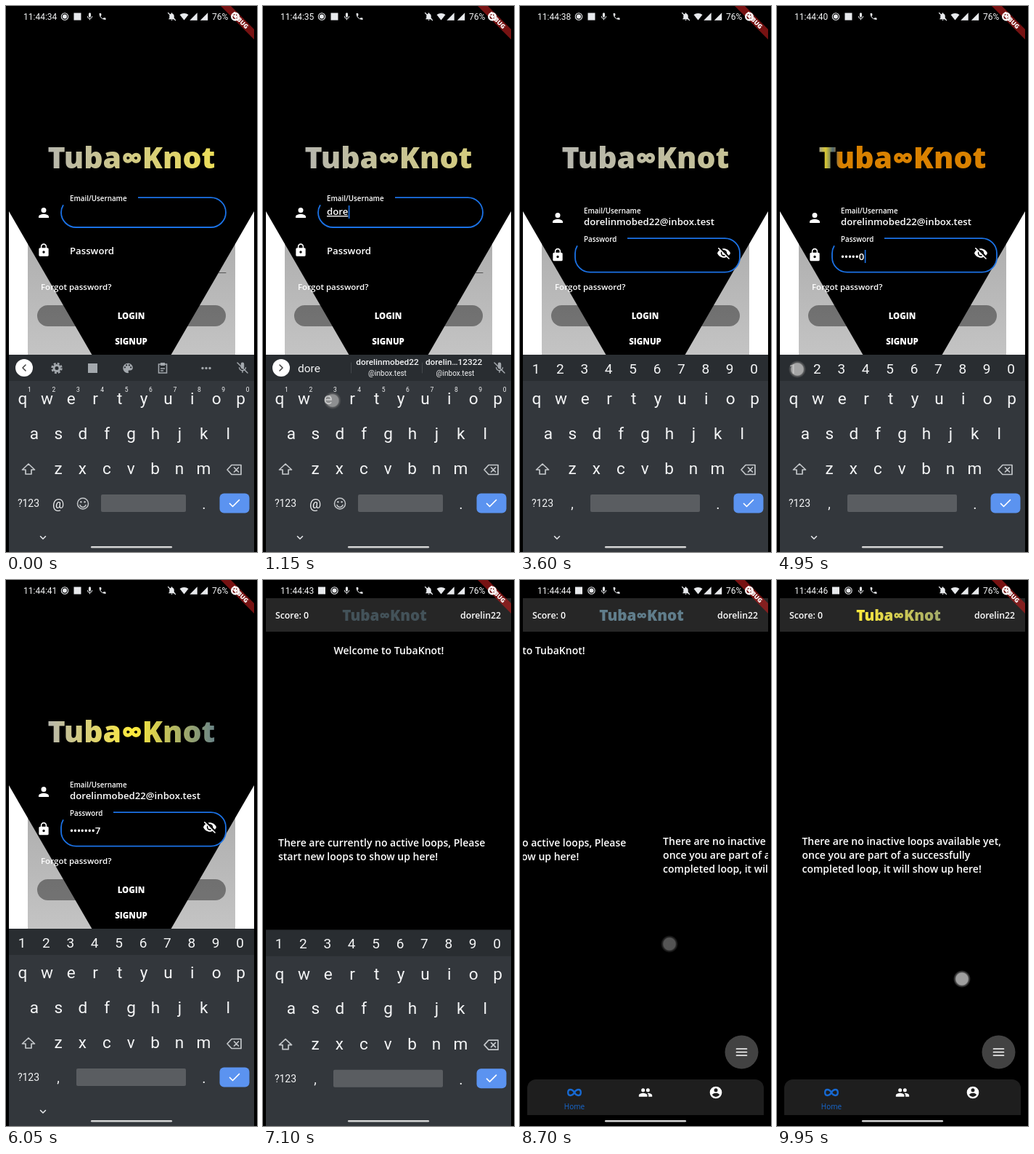
These frames come from a looping animation (346 px wide and 750 px high, 10000 ms). An HTML page:

```html
<!DOCTYPE html>
<html lang="en">
<head>
<meta charset="utf-8">
<title>Login demo</title>
<style>
  html, body { margin: 0; width: 100%; height: 100%; overflow: hidden; background: #000; }
  svg { display: block; width: 346px; height: 750px; }
  text { font-family: "Open Sans", sans-serif; font-weight: 600; fill: #fff; white-space: pre; }
  .r { font-family: Roboto, sans-serif; font-weight: 400; fill: #f4f5f6; }
  .b { font-weight: 800; }
  .m { text-anchor: middle; }
  .e { text-anchor: end; }
  .line { fill: none; stroke: #1b72e6; stroke-width: 1.8; }
  .tool { fill: none; stroke: #a3a8ad; stroke-width: 1.6; }
</style>
</head>
<body>
<svg viewBox="0 0 346 750">
  <defs>
    <clipPath id="screen"><rect x="4" y="0" width="338" height="750"/></clipPath>
    <linearGradient id="card" x1="0" y1="0" x2="0" y2="1">
      <stop offset="0" stop-color="#a9a9a9"/><stop offset="1" stop-color="#c4c4c4"/>
    </linearGradient>
    <linearGradient id="big" gradientUnits="userSpaceOnUse" x1="57" y1="0" y2="0">
      <stop offset="0" stop-color="#b6b6ae"/><stop offset=".333" stop-color="#ffeb3b"/>
      <stop offset=".667" stop-color="#607d8b"/><stop offset="1" stop-color="#ff9800"/>
    </linearGradient>
    <linearGradient id="small" gradientUnits="userSpaceOnUse" x1="109" y1="0" y2="0">
      <stop offset="0" stop-color="#ffeb3b"/><stop offset="1" stop-color="#607d8b"/>
    </linearGradient>
    <radialGradient id="dot">
      <stop offset=".68" stop-color="#bbb"/><stop offset=".8" stop-color="#777" stop-opacity=".7"/>
      <stop offset="1" stop-color="#888" stop-opacity="0"/>
    </radialGradient>
  </defs>
  <rect width="346" height="750"/>
  <g id="stage" clip-path="url(#screen)"></g>
</svg>
<script>
const LOOP = 10000, PITCH = 33.4;
const NAME = 'dorelinm', USER = 'dorelinmobed22', HOST = '@inbox.test', PASS = 'mint2017';
const ROWS = [['1234567890', 22, 498], ['qwertyuiop', 23, 541], ['asdfghjkl', 39, 588], ['zxcvbnm', 72, 636]];
const CLOCK = [0, 600, 1400, 2150, 3050, 4000, 4850, 5650, 6350, 7050, 7950, 8850, 9700];
const typeAt = i => 350 + i * 255;
const passAt = i => 3750 + i * 220;
const FILL = 2690, FOCUS = 3050, HOME = 6750, HIDE = 7080;

const ICONS = {
  person: 'M12 12a4 4 0 1 0 0-8 4 4 0 0 0 0 8zm0 2c-2.67 0-8 1.34-8 4v2h16v-2c0-2.66-5.33-4-8-4z',
  lock: 'M18 8h-1V6A5 5 0 0 0 7 6v2H6a2 2 0 0 0-2 2v10a2 2 0 0 0 2 2h12a2 2 0 0 0 2-2V10a2 2 0 0 0-2-2zm-6 9a2 2 0 1 1 0-4 2 2 0 0 1 0 4zm3.1-9H8.9V6a3.1 3.1 0 0 1 6.2 0z',
  mic: 'M12 14a3 3 0 0 0 3-3V5a3 3 0 0 0-6 0v6a3 3 0 0 0 3 3zm5-3a5 5 0 0 1-10 0H5c0 3.53 2.61 6.43 6 6.92V21h2v-3.08c3.39-.49 6-3.39 6-6.92z',
  call: 'M6.6 10.8a15 15 0 0 0 6.6 6.6l2.2-2.2a1 1 0 0 1 1-.25 11 11 0 0 0 3.6.55 1 1 0 0 1 1 1V20a1 1 0 0 1-1 1A17 17 0 0 1 3 4a1 1 0 0 1 1-1h3.5a1 1 0 0 1 1 1c0 1.25.2 2.45.57 3.57a1 1 0 0 1-.25 1z',
  bell: 'M12 22a2 2 0 0 0 2-2h-4a2 2 0 0 0 2 2zm6-6v-5c0-3.07-1.64-5.64-4.5-6.32V4a1.5 1.5 0 0 0-3 0v.68C7.63 5.36 6 7.92 6 11v5l-2 2v1h16v-1z',
  wifi: 'M12 21.5L.5 7a19 19 0 0 1 23 0z',
  signal: 'M2 22h20V2z',
  people: 'M16 11a3 3 0 1 0 0-6 3 3 0 0 0 0 6zm-8 0a3 3 0 1 0 0-6 3 3 0 0 0 0 6zm0 2c-2.33 0-7 1.17-7 3.5V19h14v-2.5c0-2.33-4.67-3.5-7-3.5zm8 0l-.97.05c1.16.84 1.97 1.97 1.97 3.45V19h6v-2.5c0-2.33-4.67-3.5-7-3.5z',
  account: 'M12 2a10 10 0 1 0 0 20 10 10 0 0 0 0-20zm0 3a3 3 0 1 1 0 6 3 3 0 0 1 0-6zm0 14.2a7.2 7.2 0 0 1-6-3.22c.03-1.99 4-3.08 6-3.08s5.97 1.09 6 3.08a7.2 7.2 0 0 1-6 3.22z',
  palette: 'M12 3a9 9 0 0 0 0 18 1.5 1.5 0 0 0 1.1-2.5 1.5 1.5 0 0 1 1.1-2.5H16a5 5 0 0 0 5-5c0-4.42-4.03-8-9-8zm-5.5 9a1.5 1.5 0 1 1 0-3 1.5 1.5 0 0 1 0 3zm3-4a1.5 1.5 0 1 1 0-3 1.5 1.5 0 0 1 0 3zm5 0a1.5 1.5 0 1 1 0-3 1.5 1.5 0 0 1 0 3zm3 4a1.5 1.5 0 1 1 0-3 1.5 1.5 0 0 1 0 3z'
};
const icon = (name, x, y, s, fill = '#fff') =>
  `<path fill="${fill}" fill-rule="evenodd" transform="translate(${x - s / 2} ${y - s / 2}) scale(${s / 24})" d="${ICONS[name]}"/>`;
const text = (x, y, size, str, cls = '', more = '') =>
  `<text x="${x}" y="${y}" font-size="${size}" class="${cls}" ${more}>${str}</text>`;
const rect = (x, y, w, h, fill, rx = 0) =>
  `<rect x="${x}" y="${y}" width="${w}" height="${h}" rx="${rx}" fill="${fill}"/>`;
const disc = (x, y, r, fill) => `<circle cx="${x}" cy="${y}" r="${r}" fill="${fill}"/>`;
const stroke = (d, color, w) =>
  `<path d="${d}" fill="none" stroke="${color}" stroke-width="${w}" stroke-linecap="round" stroke-linejoin="round"/>`;
const group = (id, ...parts) => `<g id="${id}">${parts.join('')}</g>`;
const keys = ([chars, x, y], size, dy) =>
  [...chars].map((c, i) => text(x + i * PITCH, y + dy, size, c, 'r m')).join('');
// Pill outline with a gap in its top edge for the label
const outline = (top, h, gap) =>
  `<path class="line" d="M${gap} ${top}H282.5a20.5 20.5 0 0 1 20.5 20.5V${top + h - 20.5}a20.5 20.5 0 0 1-20.5 20.5H96.5A20.5 20.5 0 0 1 76 ${top + h - 20.5}V${top + 20.5}A20.5 20.5 0 0 1 79 ${top + 10}"/>`;

const login = group('login',
  rect(4, 281, 338, 200, '#fff'), rect(30, 281, 286, 200, 'url(#card)'),
  rect(43, 411, 260, 29, 'rgba(0,0,0,.4)', 14.5),
  '<path d="M4 282L119 480H227L342 282V0H4z"/>',
  text(173, 223, 41, 'Tuba∞Knot', 'b m', 'id="logo" style="fill:url(#big)"'),
  group('mailOn', text(88, 268, 9.8, 'Email/Username'), outline(263.2, 40.8, 182),
    icon('person', 52, 284, 21), icon('lock', 52, 335.5, 20),
    text(88, 341, 13.2, 'Password'), stroke('M293 366.5H303', '#555', 1)),
  group('passOn', text(88, 284.5, 9.8, 'Email/Username'), icon('person', 52, 291, 21),
    icon('lock', 52, 342, 20), text(88, 324, 9.8, 'Password'), outline(319.2, 46.5, 148),
    '<path fill="#fff" d="M272 339.5c3.4-8.3 14.6-8.3 18 0c-3.4 8.3-14.6 8.3-18 0z"/>',
    disc(281, 339.5, 4.2, '#000'), disc(281, 339.5, 2.6, '#fff'),
    stroke('M275 332L289.5 346.5', '#000', 3), stroke('M273.8 332.8L288 347', '#fff', 1.6)),
  text(88, 287, 13.2, '', '', 'id="mail"'),
  text(88, 349, 13.2, '', '', 'id="pass"'),
  '<rect id="caret" width="1.6" height="18" fill="#1b72e6"/>',
  text(48, 390, 11.5, 'Forgot password?'),
  text(172.5, 429.5, 11.5, 'LOGIN', 'b m'), text(172.5, 464.5, 11.5, 'SIGNUP', 'b m'));

const home = group('home', rect(4, 0, 338, 750, '#000'),
  group('pages', text(173.5, 102, 14, 'Welcome to TubaKnot!', 'm'),
    text(21, 366, 14, 'There are currently no active loops, Please'),
    text(21, 385, 14, 'start new loops to show up here!'),
    ['There are no inactive loops available yet,', 'once you are part of a successfully',
      'completed loop, it will show up here!'].map((s, i) => text(357, 364 + 19 * i, 14, s)).join('')),
  rect(4, 25, 338, 46, '#262626'), text(17, 52.5, 12.3, 'Score: 0'),
  text(328, 52.5, 12.3, 'dorelin22', 'e'),
  text(167.5, 56, 20.7, 'Tuba∞Knot', 'b m', 'id="title" style="fill:url(#small)"'),
  disc(305.5, 648.5, 23, '#424242'),
  stroke('M298.5 644H312.5M298.5 648.5H312.5M298.5 653H312.5', '#fff', 1.7),
  '<path fill="#1e1e1e" d="M10 735V698a12 12 0 0 1 12-12H324a12 12 0 0 1 12 12V735z"/>',
  stroke('M75 704c-3-5.3-8.8-5.3-8.8 0s5.8 5.3 8.8 0s8.8-5.3 8.8 0s-5.8 5.3-8.8 0', '#1769d2', 2.4),
  text(75, 727, 10, 'Home', 'm', 'style="fill:#1769d2;font-weight:400"'),
  icon('people', 173, 704, 20), icon('account', 270, 704, 20));

const chevron = dir => disc(25, 497, 12, '#fff') + stroke(`M${25 - 2 * dir} 493l${4 * dir} 4l${-4 * dir} 4`, '#444', 1.6);
const keyboard = group('board',
  rect(4, 479, 338, 290, '#33373c'), rect(4, 479, 338, 36, '#292d31'),
  keys(ROWS[1], 22.6, 6), keys(ROWS[2], 22.6, 6.5), keys(ROWS[3], 22.6, 7),
  stroke('M31 629l8.5 8h-4.5v6h-8v-6h-4.5z', '#c4c7ca', 1.7),
  stroke('M311 630.5h13v13h-13l-6-6.5zM314.5 634l6 6m0-6l-6 6', '#c4c7ca', 1.7),
  text(31, 688, 14, '?123', 'r m'), text(273, 691, 20, '.', 'r m'),
  rect(294.5, 669.5, 41, 27, '#5b93f0', 6), stroke('M308.5 683.5l4 4l9-9', '#fff', 1.7),
  group('mailKeys', [...'1234567890'].map((c, i) => text(32.5 + i * PITCH, 530, 8.5, c, 'r m')).join(''),
    text(72, 690, 18, '@', 'r m'), rect(131, 671, 117, 24, '#5a5d61', 2),
    stroke('M98.5 683.5a7.5 7.5 0 1 0 15 0a7.5 7.5 0 1 0-15 0M102 685.5a4.2 4.2 0 0 0 8 0', '#c4c7ca', 1.5),
    disc(103.4, 681.3, 1.2, '#c4c7ca'), disc(108.6, 681.3, 1.2, '#c4c7ca'),
    icon('mic', 326, 497, 18, '#a3a8ad'), stroke('M319 490L333 504', '#a3a8ad', 1.5)),
  group('tools', chevron(-1),
    '<circle class="tool" cx="70" cy="497.5" r="4" style="stroke-width:3"/>',
    '<circle class="tool" cx="70" cy="497.5" r="6.5" style="stroke-width:2.4;stroke-dasharray:2.9 2.205"/>',
    rect(113, 491, 13, 13, '#a3a8ad'), icon('palette', 168, 497.5, 18, '#a3a8ad'),
    '<path class="tool" d="M210.5 492h11v12h-11zM213 498h6m-6 3h4"/>', rect(213, 490, 6, 4, '#a3a8ad'),
    [271, 276, 281].map(x => disc(x, 497.5, 1.7, '#a3a8ad')).join('')),
  group('hints', chevron(1), text(48, 503, 15.5, '', 'r', 'id="word"'),
    stroke('M121.5 490v14M219.5 490v14', '#44484c', 1),
    text(171.5, 493, 11.8, USER, 'r m', 'style="font-weight:500"'), text(171.5, 507.5, 10, HOST, 'r m'),
    text(263, 493, 11.8, 'dorelin…12322', 'r m', 'style="font-weight:500"'), text(265, 507.5, 10, HOST, 'r m')),
  group('passKeys', keys(ROWS[0], 19, 6.7), text(72, 690, 18, ',', 'r m'), rect(97, 671, 151, 24, '#5a5d61', 2)),
  group('down', stroke('M47.5 728.5l3.5 3.5l3.5-3.5', '#e8eaed', 1.5)));

const status = group('status', text(24, 18.5, 12, '', 'r', 'id="clock"'),
  group('rec', '<circle r="4.7" fill="none" stroke="#e8eaed" stroke-width="1.1"/>', disc(0, 0, 3, '#e8eaed')),
  group('app', rect(-5, -5, 10, 10, '#e8eaed')),
  icon('mic', 115.5, 14.5, 12.5, '#e8eaed'), icon('call', 133, 14.5, 12, '#e8eaed'),
  icon('bell', 228.5, 14.5, 13, '#e8eaed'), stroke('M223.5 9.5l10 10', '#e8eaed', 1.2),
  icon('wifi', 245.5, 14.5, 12.5, '#e8eaed'), icon('signal', 258.5, 14.5, 12.5, '#e8eaed'),
  icon('signal', 273, 14.5, 12.5, '#e8eaed'), text(284, 18.5, 12, '76%', 'r'),
  '<path d="M296 0H310L342 32V46z" fill="#b71c1c" fill-opacity=".65"/>',
  text(322.5, 22.5, 8.4, 'DEBUG', 'b m', 'transform="rotate(45 322.5 19.5)"'),
  '<circle cx="316" cy="14.5" r="4.8" fill="none" stroke="#fff" stroke-width="2.4"/>', disc(316, 14.5, 1.8, '#fff'));

document.getElementById('stage').innerHTML = login + home + keyboard + status +
  rect(117, 742, 112, 2.6, '#d4d4d4', 1.3) + '<circle id="touch" r="12" fill="url(#dot)"/>';
const el = {};
document.querySelectorAll('[id]').forEach(n => el[n.id] = n);

const clamp = v => Math.max(0, Math.min(1, v));
const ramp = (t, a, b) => clamp((t - a) / (b - a));
const show = (id, on) => el[id].style.display = on ? '' : 'none';
const move = (id, x, y) => el[id].setAttribute('transform', `translate(${x} ${y})`);
const count = (t, at, n) => { let i = 0; while (i < n && t >= at(i)) i++; return i; };
const keyPos = c => {
  const [chars, x, y] = ROWS.find(r => r[0].includes(c));
  return [x + chars.indexOf(c) * PITCH + 6, y + 1];
};

// Taps as [time, x, y]
const TAPS = [
  ...[...NAME].map((c, i) => [typeAt(i) - 90, ...keyPos(c)]),
  [2590, 171, 497], [2980, 172, 336],
  ...[...PASS].map((c, i) => [passAt(i) - 140, ...keyPos(c)]),
  [5700, 172, 425], [9860, 255, 548]
];
const SWIPE = 8450, RELEASE = 8630;

function drawTouch(t) {
  let x, y, a = 0;
  const tap = TAPS.findLast(p => p[0] <= t);
  if (t >= SWIPE && t < 9000) {
    x = 301 - 95 * ramp(t, SWIPE, RELEASE);
    y = 500;
    a = 1 - ramp(t, RELEASE, RELEASE + 150);
  } else if (tap) {
    [, x, y] = tap;
    a = 1 - ramp(t, tap[0] + 100, tap[0] + 220);
  }
  el.touch.style.opacity = a * .85;
  if (a) move('touch', x, y);
}

function drawForm(t) {
  const typed = count(t, typeAt, NAME.length), filled = t >= FILL, onPass = t >= FOCUS;
  const n = count(t, passAt, PASS.length);
  el.mail.textContent = filled ? USER + HOST : NAME.slice(0, typed);
  el.mail.setAttribute('y', onPass ? 301 : 287);
  el.mail.style.textDecoration = filled ? '' : 'underline';
  const fresh = n && t - passAt(n - 1) < 1000;
  el.pass.textContent = '•'.repeat(fresh ? n - 1 : n) + (fresh ? PASS[n - 1] : '');
  el.word.textContent = NAME.slice(0, typed);
  show('mailOn', !onPass);
  show('passOn', onPass);
  show('mailKeys', !onPass);
  show('passKeys', onPass);
  show('hints', typed && !filled);
  show('tools', !onPass && (!typed || filled));

  const last = onPass ? (n ? passAt(n - 1) : FOCUS) : filled ? FILL : typed ? typeAt(typed - 1) : -600;
  const field = onPass ? el.pass : el.mail;
  show('caret', Math.floor((t - last) / 500) % 2 === 0);
  el.caret.setAttribute('x', 88.5 + field.getComputedTextLength());
  el.caret.setAttribute('y', onPass ? 335 : 274);
}

function draw(t) {
  el.clock.textContent = '11:44:' + (33 + CLOCK.filter(c => c <= t).length);
  const swap = t >= HOME;
  move('rec', swap ? 98.5 : 81, 14.5);
  move('app', swap ? 81 : 98.5, 14.5);

  const cycle = 4500, sweep = t < cycle ? 930 + t * .63 : 30 * ((t - cycle) / 450) ** 2;
  el.big.setAttribute('x2', 57.01 + sweep);
  el.logo.style.opacity = t < cycle ? 1 - ramp(t, 3900, 4300) : ramp(t, cycle, 5030);
  drawForm(t);

  show('login', t < HOME + 200);
  show('home', t >= HOME);
  el.home.style.opacity = ramp(t, HOME, HOME + 200);
  el.title.style.opacity = ramp(t, 7000, 7200);
  el.small.setAttribute('x2', 109.01 + 200 * ramp(t, 8750, 9950) ** 1.7);
  const fling = t > RELEASE ? 1 - Math.exp((RELEASE - t) / 212) : 0;
  move('pages', -(95 * ramp(t, SWIPE, RELEASE) + 228 * fling), 0);

  const drop = ramp(t, HIDE, HIDE + 270);
  move('board', 0, 275 * drop ** 2);
  show('board', drop < 1);
  show('down', t < HIDE);
  drawTouch(t);
}

const start = performance.now();
function tick() {
  draw((performance.now() - start) % LOOP);
  requestAnimationFrame(tick);
}
tick();
</script>
</body>
</html>
```
